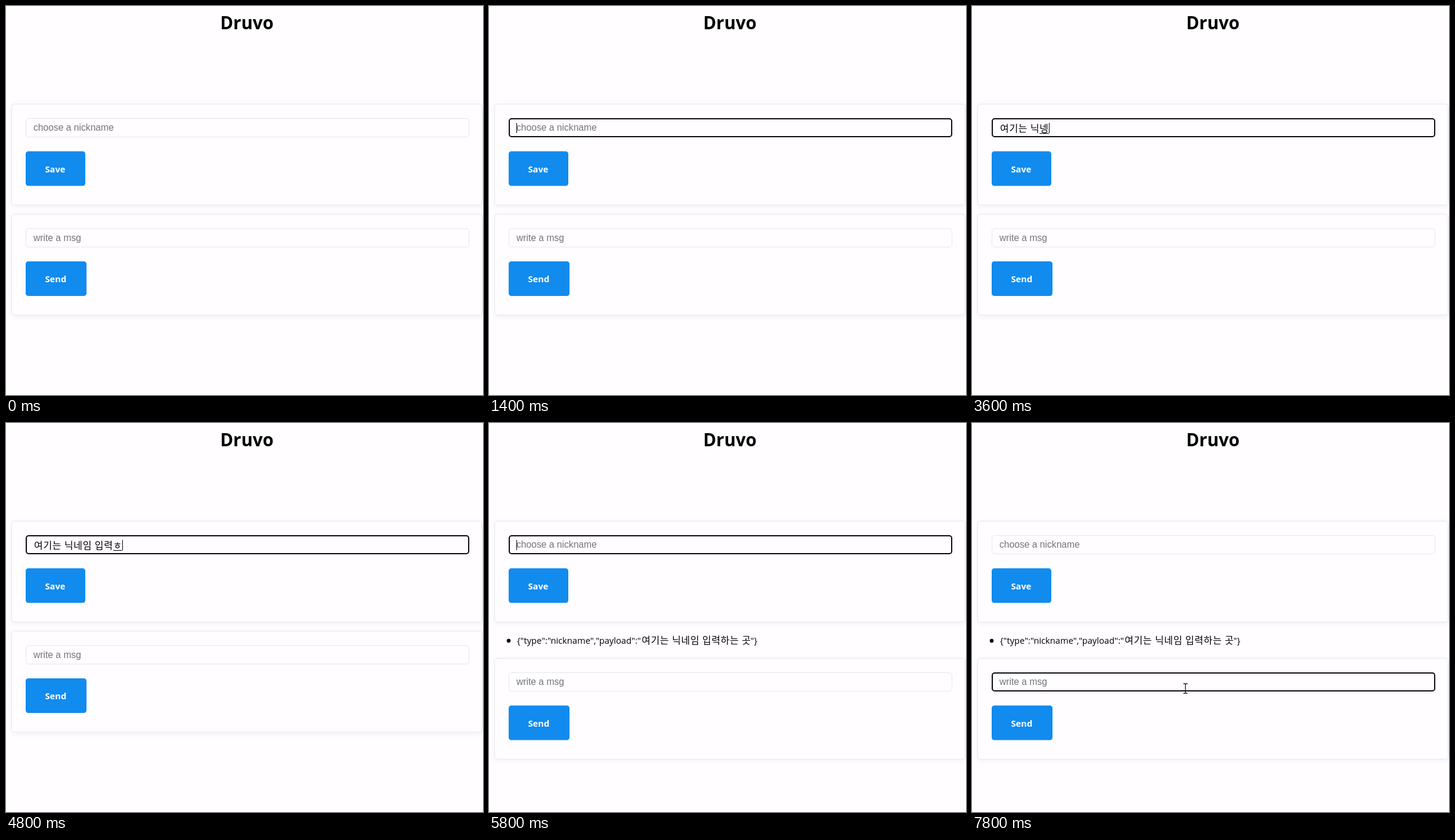
These frames come from a looping animation (800x652 px, 8000 ms). An HTML page:

```html
<!DOCTYPE html>
<html lang="en">
<head>
<meta charset="utf-8">
<title>Druvo</title>
<style>
  html, body { margin: 0; width: 100%; height: 100%; overflow: hidden; background: #fffdff; }
  svg { display: block; width: 800px; height: 652px; font: 14.7px "Open Sans", "Noto Sans", sans-serif; }
  .title { font-size: 29.5px; font-weight: 700; text-anchor: middle; }
  .card { fill: #fffdff; stroke: #e7e6ee; filter: drop-shadow(1px 2px 4px #f0eff4); }
  .box { fill: #fffdff; stroke: #e6e5ee; }
  .ring { fill: none; stroke: #0c0c12; stroke-width: 2; visibility: hidden; }
  .focused .ring { visibility: visible; }
  .hint { font: 15.65px "Liberation Sans", Arial, sans-serif; fill: #757575; }
  .button { fill: #118bee; }
  .label { font-weight: 700; fill: #fff; }
  .korean {
    font: 300 16px "Noto Sans CJK KR", "Noto Sans CJK", "Noto Sans CJK JP", sans-serif;
    letter-spacing: .68px; word-spacing: .44px; white-space: pre;
  }
  .arrow { fill: #fff; stroke: #1c1c24; }
  .beam { fill: none; stroke: #16161c; stroke-width: 1.3; }
</style>
</head>
<body>
<svg viewBox="0 0 800 652">
  <text class="title" x="404" y="39">Druvo</text>

  <g id="nickname">
    <rect class="card" x="9.5" y="164.5" width="789" height="169" rx="4.5"/>
    <rect class="box" x="33.5" y="188.5" width="743" height="31" rx="4.5"/>
    <rect class="ring" x="34" y="189" width="742" height="30" rx="4"/>
    <text class="hint" x="46" y="209">choose a nickname</text>
    <rect class="button" x="33" y="243.5" width="100" height="58" rx="4.5"/>
    <text class="label" x="65.5" y="278.5">Save</text>
  </g>

  <g id="entry">
    <text class="korean" x="47" y="210.5"></text>
    <path stroke="#000" fill="none"/>
  </g>

  <g id="log">
    <circle cx="33" cy="365" r="3.2"/>
    <text x="47" y="370">{"type":"nickname","payload":"</text>
    <text class="korean" x="256" y="370"></text>
    <text x="438.5" y="370">"}</text>
  </g>

  <g id="message">
    <rect class="card" x="9.5" y="164.5" width="789" height="169" rx="4.5"/>
    <rect class="box" x="33.5" y="188.5" width="743" height="31" rx="4.5"/>
    <rect class="ring" x="34" y="189" width="742" height="30" rx="4"/>
    <text class="hint" x="46" y="209">write a msg</text>
    <rect class="button" x="33" y="243.5" width="102" height="58" rx="4.5"/>
    <text class="label" x="65.5" y="278.5">Send</text>
  </g>

  <rect id="caret" width="1" height="17"/>
  <g id="pointer">
    <path class="arrow" d="M.5 .5V16L4 12.7L6.4 18.2L9 17.1L6.6 11.7H11.4Z"/>
    <path class="beam" d="M-3.5 -8H-1L0 -7L1 -8H3.5M0 -7V7M-3.5 8H-1L0 7L1 8H3.5"/>
  </g>
</svg>
<script>
const LOOP = 8000, TICK = 200, BLINK = 500;
const PHRASE = '여기는 닉네임 입력하는 곳';
const SYLLABLE = 15.4, SPACE = 4.7, TEXT_X = 47;
const HANGUL = 0xAC00, FINAL_COUNT = 28, INITIAL_SPAN = 588;
const INITIALS = 'ㄱㄲㄴㄷㄸㄹㅁㅂㅃㅅㅆㅇㅈㅉㅊㅋㅌㅍㅎ';
const FINALS = ' ㄱㄲㄳㄴㄵㄶㄷㄹㄺㄻㄼㄽㄾㄿㅀㅁㅂㅄㅅㅆㅇㅈㅊㅋㅌㅍㅎ';

// Field contents after each key, as a Korean input method composes them
function keystrokes(phrase) {
  const states = [''];
  let done = '';
  for (const ch of phrase) {
    const code = ch.charCodeAt(0) - HANGUL;
    if (code >= 0) {
      const final = code % FINAL_COUNT;
      const initial = INITIALS[Math.floor(code / INITIAL_SPAN)];
      const last = done.charCodeAt(done.length - 1);
      const open = last >= HANGUL && (last - HANGUL) % FINAL_COUNT === 0;
      // A consonant first joins an open syllable, until its vowel arrives
      states.push(open
        ? done.slice(0, -1) + String.fromCharCode(last + FINALS.indexOf(initial))
        : done + initial);
      if (final) states.push(done + String.fromCharCode(HANGUL + code - final));
    }
    done += ch;
    states.push(done);
  }
  return states;
}

const typed = keystrokes(PHRASE);
const TYPE_START = 1932, KEY_TIME = 117;
const FOCUS_NICK = 1000, FOCUS_MSG = 7200;
const SENT = TYPE_START + typed.length * KEY_TIME;

// Pointer paths as [time, x, y]; the pointer is hidden between them
const paths = [
  [[400, 410, 296], [800, 308, 204], [1200, 297, 189]],
  [[6600, 318, 300], [6800, 350, 463], [7000, 353, 457],
   [7200, 364, 445], [7400, 358, 445], [7800, 358, 445]]
];

const $ = selector => document.querySelector(selector);
const show = (node, on) => node.setAttribute('visibility', on ? 'visible' : 'hidden');
const nickname = $('#nickname'), message = $('#message'), hint = $('#nickname .hint');
const entryText = $('#entry text'), underline = $('#entry path');
const log = $('#log'), caret = $('#caret');
const pointer = $('#pointer'), arrow = $('.arrow'), beam = $('.beam');
$('#log .korean').textContent = PHRASE;

function pointerAt(t) {
  const path = paths.find(p => t >= p[0][0] && t <= p.at(-1)[0]);
  if (!path) return null;
  const next = Math.max(1, path.findIndex(p => p[0] >= t));
  const [t0, x0, y0] = path[next - 1], [t1, x1, y1] = path[next];
  const k = (t - t0) / (t1 - t0);
  return [x0 + (x1 - x0) * k, y0 + (y1 - y0) * k];
}

const textWidth = text =>
  [...text].reduce((sum, ch) => sum + (ch === ' ' ? SPACE : SYLLABLE), 0);

function render(t) {
  const sent = t >= SENT;
  const offset = sent ? 230 : 184.5;
  const onMessage = t >= FOCUS_MSG;
  const keys = Math.max(0, Math.floor((t - TYPE_START) / KEY_TIME));
  const text = sent ? '' : typed[keys];

  nickname.classList.toggle('focused', t >= FOCUS_NICK && !onMessage);
  message.classList.toggle('focused', onMessage);
  message.setAttribute('transform', `translate(0 ${offset})`);
  show(log, sent);
  show(hint, !text);

  const end = TEXT_X + textWidth(text);
  const composing = text && !text.endsWith(' ');
  entryText.textContent = text;
  underline.setAttribute('d', composing ? `M${end - SYLLABLE} 213.5H${end}` : '');

  const blinkStart = onMessage ? FOCUS_MSG : sent ? SENT : FOCUS_NICK;
  const lit = Math.floor((t - blinkStart) / BLINK) % 2 === 0;
  show(caret, t >= FOCUS_NICK && (text || lit));
  caret.setAttribute('x', Math.round(end) - (text ? 0 : 1));
  caret.setAttribute('y', onMessage ? 196 + offset : 196);

  // The cursor shape follows its position one tick late
  const spot = pointerAt(t), before = pointerAt(t - TICK);
  const inside = top => before && before[1] >= top && before[1] <= top + 32;
  const overInput = inside(188) || inside(188 + offset);
  show(arrow, spot && !overInput);
  show(beam, spot && overInput);
  if (spot) pointer.setAttribute('transform', `translate(${spot})`);
}

const start = performance.now();
function frame() {
  const t = (performance.now() - start) % LOOP;
  render(Math.floor(t / TICK) * TICK);
  requestAnimationFrame(frame);
}
frame();
</script>
</body>
</html>
```
